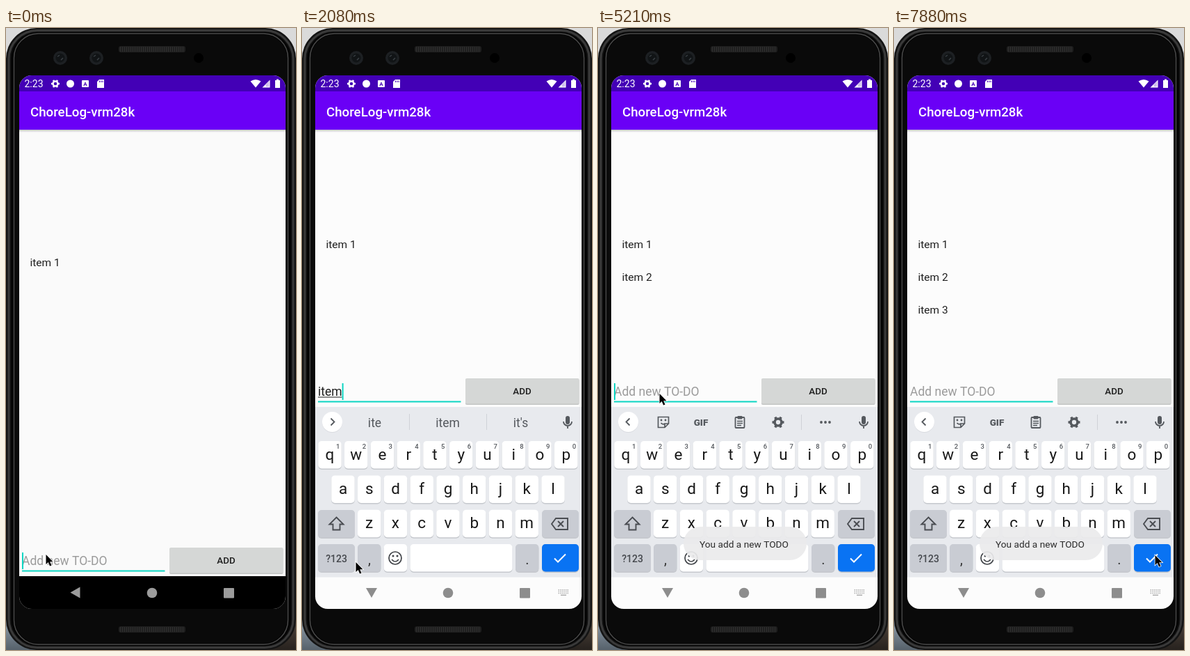
An HTML page with a canvas that plays this animation: 417 px wide and 893 px high, repeating every 8000 ms.

```html
<!DOCTYPE html>
<html lang="en">
<head>
<meta charset="utf-8">
<title>To-do app demo</title>
<style>
html, body { margin: 0; width: 100%; height: 100%; overflow: hidden; background: #000; }
canvas { display: block; }
</style>
</head>
<body>
<canvas id="stage" width="417" height="893"></canvas>
<script>
const ctx = document.getElementById('stage').getContext('2d');
const LOOP = 8000, STEP = 148.6;
const INK = '#1f1f1f', ICON = '#55595e', TEAL = '#0cd6c3';

// [start, typed text, suggestions]; each entry restarts the caret blink
const IT = ['it', "it's", 'its'], ITE = ['ite', 'item', "it's"], ITEM = ['item', 'items', 'itemized'];
const typing = [
  [-200, ''], [700, ''],
  [1480, 'i', ['i', 'in', 'it']], [1630, 'it', IT], [1780, 'ite', ITE], [2070, 'item', ITE],
  [2220, 'item', ITEM], [2370, 'item ', ITEM], [2520, 'item 2'], [4155, ''],
  [5490, 'i', ['i', 'in', 'it']], [5640, 'it', IT], [5790, 'ite', ITE], [5940, 'item', ITE],
  [6090, 'item', ITEM], [6240, 'item ', ITEM], [6680, 'item 3'], [7210, '']
];
const pointer = [
  [590, 57, 756], [890, 77, 767], [2370, 77, 767], [2675, 225, 672], [2823, 297, 594],
  [2972, 294, 545], [3115, 289, 520], [4310, 289, 520], [4700, 190, 528], [5050, 88, 525],
  [6680, 88, 525], [6985, 318, 520], [7280, 318, 520], [7430, 350, 610], [7580, 388, 722],
  [7720, 374, 760], [7875, 375, 757]
];

const clamp = v => Math.max(0, Math.min(1, v));
const ramp = (t, a, b) => clamp((t - a) / (b - a));

function box(x, y, w, h, r, color) {
  ctx.fillStyle = color;
  ctx.beginPath();
  ctx.roundRect(x, y, w, h, r);
  ctx.fill();
}
function ring(x, y, w, h, r, color, width) {
  ctx.strokeStyle = color;
  ctx.lineWidth = width;
  ctx.beginPath();
  ctx.roundRect(x, y, w, h, r);
  ctx.stroke();
}
function dot(x, y, r, color) {
  ctx.fillStyle = color;
  ctx.beginPath();
  ctx.arc(x, y, r, 0, 7);
  ctx.fill();
}
function text(s, x, y, size, color, align = 'left', weight = 400) {
  ctx.font = `${weight} ${size}px Roboto, sans-serif`;
  ctx.textAlign = align;
  ctx.fillStyle = color;
  ctx.fillText(s, x, y);
}
function shape(x, y, d, fill, stroke, width = 2, angle = 0) {
  const path = new Path2D(d);
  ctx.save();
  ctx.translate(x, y);
  ctx.rotate(angle);
  ctx.lineWidth = width;
  if (stroke) { ctx.strokeStyle = stroke; ctx.stroke(path); }
  if (fill) { ctx.fillStyle = fill; ctx.fill(path); }
  ctx.restore();
}
function fade(y, h, from, to) {
  const g = ctx.createLinearGradient(0, y, 0, y + h);
  g.addColorStop(0, from);
  g.addColorStop(1, to);
  return g;
}
function gear(x, y, r, color) {
  ctx.strokeStyle = color;
  ctx.lineWidth = r * .42;
  ctx.beginPath();
  ctx.arc(x, y, r * .58, 0, 7);
  ctx.stroke();
  for (let i = 0; i < 6; i++) {
    const a = i * Math.PI / 3, c = Math.cos(a), s = Math.sin(a);
    ctx.beginPath();
    ctx.moveTo(x + c * r * .6, y + s * r * .6);
    ctx.lineTo(x + c * r, y + s * r);
    ctx.stroke();
  }
}

function drawPhone() {
  box(0, 0, 417, 60, 0, '#dadada');
  box(0, 833, 209, 60, 0, fade(855, 38, '#8a97a3', '#56616b'));
  box(209, 833, 208, 60, 0, fade(855, 38, '#4a4038', '#27221e'));
  box(0, 0, 417, 893, 44, '#141414');
  ring(4, 3.5, 409, 886, 41, '#3a3a3a', 3);
  box(7, 6, 403, 881, 38, '#050505');
  ring(11.5, 8, 394, 877, 35, '#4a4a4a', 1.5);
  box(13, 9.5, 391, 874, 34, '#0a0a0a');
  for (const y of [26, 859]) {
    box(162, y, 96, 9, 3, '#1f1f1f');
    for (let x = 164; x < 257; x += 3) box(x, y + 1, 1, 7, 0, '#303030');
  }
  for (const x of [78, 130]) {
    dot(x, 43, 10, '#1d2023');
    dot(x, 43, 6.5, '#111416');
    shape(x, 43, 'M-4-2L-1-4M1 3L4 0', null, '#3b4045', 1.5);
  }
  dot(277, 43, 7, '#000');
}

function drawBars() {
  box(19, 68, 383, 24, 0, '#4300b6');
  box(19, 91, 383, 55, 0, '#6a00f6');
  box(19, 146, 383, 4, 0, fade(146, 4, 'rgba(0,0,0,.22)', 'rgba(0,0,0,0)'));
  text('2:23', 26.5, 85, 14, '#fff');
  gear(71, 80, 6, '#fff');
  dot(92.5, 80, 5.5, '#fff');
  box(109, 75, 10, 10, 1, '#fff');
  text('A', 114, 83, 8, '#4300b6', 'center', 700);
  shape(136, 80, 'M-2-6H5V6H-5V-3Z', '#fff');
  shape(136, 80, 'M-1.5-4.5V-2M.8-4.5V-2M3-4.5V-2', null, '#4300b6', 1);
  shape(359, 85.5, 'M0 0L-7.5-9Q0-14 7.5-9Z', '#fff');
  shape(379.5, 85.5, 'M0 0H-11L0-11Z', '#fff');
  shape(374.5, 84.3, 'M-1 0H3.8V-8L-1-3Z', 'rgba(67,0,182,.25)');
  shape(390.5, 80, 'M-1.5-6.5H1.5V-5H3.5V6H-3.5V-5H-1.5Z', '#fff');
  text('ChoreLog-vrm28k', 35, 126.5, 18.7, '#fff', 'left', 500);
}

function drawInput(t, top, entry, pressed) {
  const [start, typed] = entry;
  if (typed) text(typed, 23, top + 25, 17.5, INK);
  else text('Add new TO-DO', 23, top + 25, 17.5, '#9b9b9b');
  const width = s => ctx.measureText(s).width;
  if (entry[2]) box(23, top + 26.5, width(typed.trim()), 1, 0, INK);
  box(23, top + 32.5, 205.5, 2, 0, TEAL);
  if ((t - start) % 1000 < 500) box(23 + (typed ? width(typed) : 0), top + 7, 2, 24, 0, TEAL);
  box(235, top + 1, 163.5, 37, 2, '#c3c5c4');
  box(235, top, 163.5, 36.5, 2, pressed ? '#cdcfce' : '#d5d7d6');
  text('ADD', 316.5, top + 22.7, 13.4, INK, 'center', 500);
}

function key(x, y, w, color = '#fff') {
  box(x, y + 1, w, 40, 5, '#c5c8cd');
  box(x, y, w, 39.5, 5, color);
}

function drawToolbar(words) {
  dot(43.5, 566.5, 14.5, '#d9dbe0');
  dot(43.5, 565.5, 14.5, '#fff');
  shape(43.5, 565.5, words ? 'M-2-5L3 0L-2 5' : 'M2-5L-3 0L2 5', null, ICON, 1.8);
  box(379, 557, 6, 12, 3, ICON);
  shape(382, 565, 'M-6 0A6 6 0 0 0 6 0M0 6V10', null, ICON, 1.8);
  if (words) {
    words.forEach((w, i) => text(w, 104.5 + i * 105, 572.5, 17.5, ICON, 'center'));
    for (const x of [154, 265]) box(x, 554, 1, 23, 0, '#cfd2d7');
    return;
  }
  shape(94, 566, 'M-7.5-7.5H7.5V2L2 7.5H-7.5ZM7 2H2V7M-3.5 1Q-1 4 2 2', null, ICON, 1.7);
  dot(91, 563, 1.4, ICON);
  dot(97, 563, 1.4, ICON);
  text('GIF', 148, 570.5, 13.5, ICON, 'center', 800);
  ring(197.5, 559, 13, 15, 1, ICON, 1.8);
  box(200.5, 557, 7, 4.5, 1, ICON);
  shape(204, 566, 'M-4-1.5H4M-4 1.5H4M-4 4.5H2', null, ICON, 1.3);
  gear(259, 566, 8.5, ICON);
  box(292, 555, 1, 22, 0, '#cfd2d7');
  for (const x of [321, 327, 333]) dot(x, 566, 1.9, ICON);
}

function drawKeyboard(words) {
  const grey = '#c9ccd3', pitch = 37.75;
  box(19, 544, 383, 244.5, 0, '#e8eaee');
  drawToolbar(words);
  [['qwertyuiop', 40], ['asdfghjkl', 59], ['zxcvbnm', 96.7]].forEach(([letters, x0], row) => {
    const y = 593 + row * 49.4;
    [...letters].forEach((c, i) => {
      const x = x0 + i * pitch;
      key(x - 16.7, y, 33.4);
      text(c, x, y + 26.5, 22.5, '#181818', 'center');
      if (!row) text((i + 1) % 10, x + 11.7, y + 11, 9.5, '#55595e', 'center', 500);
    });
  });
  key(23, 692, 53, grey);
  key(345, 692, 53, grey);
  shape(49.5, 712, 'M0-9.5L10 .5H5V8.5H-5V.5H-10Z', null, '#4a4d52', 1.9);
  shape(371, 712, 'M-12 0L-6-8H11V8H-6ZM-3-4L5 4M5-4L-3 4', null, '#4a4d52', 1.9);
  const y = 741;
  key(23, y, 53, grey);
  key(80, y, 33.4, grey);
  key(117.7, y, 33.4);
  key(155.5, y, 147);
  key(307, y, 33.4, grey);
  key(345, y, 53, '#0973f3');
  text('?123', 49.5, 766.5, 14, '#45484d', 'center', 500);
  text(',', 97, 770, 20, '#333', 'center');
  text('.', 324, 770, 20, '#333', 'center');
  shape(134, 761, 'M9 0A9 9 0 1 1-9 0A9 9 0 1 1 9 0M-5 2Q0 8 5 2', null, '#3f4247', 1.7);
  dot(131, 758, 1.5, '#3f4247');
  dot(137, 758, 1.5, '#3f4247');
  shape(371, 761.5, 'M-8 0L-3 5L8-6', null, '#fff', 2);
}

function drawNav(open, turn) {
  const color = open ? '#8d8d8d' : '#9c9c9c';
  if (!open) box(19, 787, 383, 47, 0, '#000');
  shape(100, 810.5, 'M-7.5 0L6.5-8V8Z', color, null, 0, -turn * Math.PI / 2);
  dot(210, 811, 7.3, color);
  box(313, 804, 15, 14.5, 1, color);
  if (open) {
    for (let r = 0; r < 3; r++)
      for (let c = 0; c < 6; c++) box(368.5 + c * 2.6, 806 + r * 2.4, 1.5, 1.4, 0, '#b0b0b0');
    box(372, 813.5, 8, 1.5, 0, '#b0b0b0');
  }
}

function drawToast(t) {
  const alpha = ramp(t, 4150, 4400) * (1 - ramp(t, 6300, 6480)) + ramp(t, 7210, 7460);
  if (!alpha) return;
  ctx.globalAlpha = alpha;
  box(123, 716, 177, 48, 24, 'rgba(235,235,236,.92)');
  text('You add a new TODO', 210, 745.5, 13.7, '#2c2c2c', 'center');
  ctx.globalAlpha = 1;
}

function drawPointer(t) {
  let i = pointer.findIndex(p => p[0] > t);
  if (i < 0) i = pointer.length;
  const a = pointer[Math.max(0, i - 1)], b = pointer[Math.min(i, pointer.length - 1)];
  const p = a === b ? 0 : ramp(t, a[0], b[0]);
  const x = a[1] + (b[1] - a[1]) * p, y = a[2] + (b[2] - a[2]) * p;
  shape(x + .5, y, 'M0 0V14L3.2 11L5.6 16.5L8 15.4L5.7 10.2H10Z', '#000', '#fff', 1.6);
}

function draw(t) {
  const open = t > 740;
  const slide = ramp(t, 700, 1190);
  const entry = typing.findLast(e => e[0] <= t);
  const pressed = t > 3855 && t < 4155 || t > 7100 && t < 7210;
  drawPhone();
  ctx.save();
  ctx.beginPath();
  ctx.roundRect(19, 68, 383, 766, 18);
  ctx.clip();
  box(19, 68, 383, 766, 0, open ? '#fcfcfc' : '#fafafa');
  drawBars();
  const count = 1 + (t >= 4155) + (t >= 7210);
  for (let i = 0; i < count; i++) text('item ' + (i + 1), 34.5, (open ? 316 : 341.7) + i * 47, 15.5, INK);
  drawInput(t, open ? 503 : 746, entry, pressed);
  if (open) {
    ctx.save();
    ctx.globalAlpha = clamp(slide * 3);
    ctx.translate(0, 50 * (1 - slide) ** 3);
    drawKeyboard(entry[2]);
    ctx.restore();
  }
  drawNav(open, 1 - (1 - slide) ** 2);
  drawToast(t);
  ctx.restore();
  drawPointer(t);
}

// Each picture is held for one step
function tick() {
  const t = performance.now() % LOOP;
  draw(Math.floor((t + 12) / STEP) * STEP);
  requestAnimationFrame(tick);
}
tick();
</script>
</body>
</html>
```
